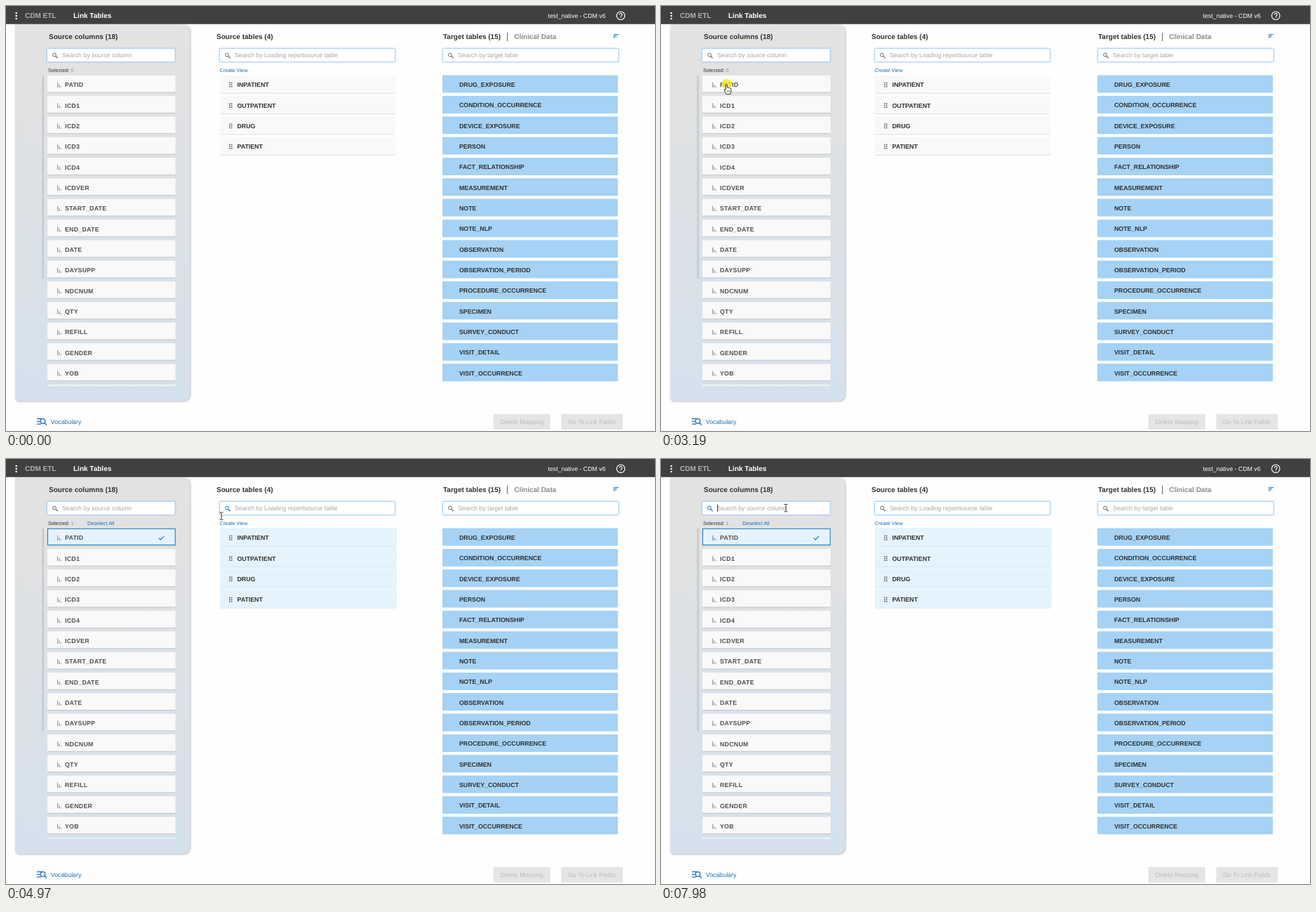
An HTML page for the animation above (8000 ms loop, 925 by 605 pixels).

```html
<!DOCTYPE html>
<html lang="en">
<head>
<meta charset="utf-8">
<title>Link Tables</title>
<style>
html, body { margin: 0; width: 100%; height: 100%; overflow: hidden; background: #fefefe; }
svg { display: block; }
text { font-family: "Liberation Sans", Arial, sans-serif; font-size: 8.8px; text-rendering: geometricPrecision; white-space: pre; }
.bold { font-weight: 700; }
.head { font-weight: 700; font-size: 10px; }
.small { font-size: 7.35px; }
</style>
</head>
<body>
<svg id="stage" width="925" height="605" viewBox="0 0 925 605">
  <defs>
    <linearGradient id="panelFill" x1="0" y1="0" x2="0" y2="1">
      <stop offset="0" stop-color="#e4e3e2"/>
      <stop offset=".25" stop-color="#e0e1e2"/>
      <stop offset="1" stop-color="#d4e1ed"/>
    </linearGradient>
    <filter id="panelShadow" x="-5%" y="-5%" width="112%" height="110%">
      <feDropShadow dx="1" dy="1" stdDeviation="1.6" flood-color="#889" flood-opacity=".6"/>
    </filter>
    <filter id="glow" x="-5%" y="-40%" width="110%" height="180%">
      <feDropShadow dx="0" dy="0" stdDeviation="1.3" flood-color="#7db8ee" flood-opacity=".75"/>
    </filter>
  </defs>
  <g id="scene"></g>
  <g id="overlay"></g>
</svg>
<script>
const LOOP = 8000, ROW = 29.33, BLUE = '#1a6fb5';
const scene = document.getElementById('scene');
const overlay = document.getElementById('overlay');

const rect = (x, y, w, h, fill, extra = '') =>
  `<rect x="${x}" y="${y}" width="${w}" height="${h}" fill="${fill}" ${extra}/>`;
const text = (x, y, str, fill, cls = '', extra = '') =>
  `<text x="${x}" y="${y}" fill="${fill}" class="${cls}" ${extra}>${str}</text>`;
const path = (d, stroke, width = 1, extra = '') =>
  `<path d="${d}" fill="none" stroke="${stroke}" stroke-width="${width}" ${extra}/>`;
const lens = (x, color, id) =>
  `<g ${id ? `id="${id}"` : ''} stroke="${color}" fill="none">
    <circle cx="${x}" cy="69.6" r="2.4"/><path d="M${x + 1.8} 71.4l2.8 2.8" stroke-width="1.3"/></g>`;
const input = (x, w, hint, id) =>
  rect(x, 60.5, w, 19, '#fff', 'rx="1" stroke="#a3cdf1" stroke-width=".8" filter="url(#glow)"') +
  lens(x + 10.5, '#666', id) + text(x + 21.5, 73, hint, '#a5a5a5');

const sourceColumns = ['PATID', 'ICD1', 'ICD2', 'ICD3', 'ICD4', 'ICDVER', 'START_DATE', 'END_DATE',
  'DATE', 'DAYSUPP', 'NDCNUM', 'QTY', 'REFILL', 'GENDER', 'YOB'];
const sourceTables = ['INPATIENT', 'OUTPATIENT', 'DRUG', 'PATIENT'];
const targetTables = ['DRUG_EXPOSURE', 'CONDITION_OCCURRENCE', 'DEVICE_EXPOSURE', 'PERSON',
  'FACT_RELATIONSHIP', 'MEASUREMENT', 'NOTE', 'NOTE_NLP', 'OBSERVATION', 'OBSERVATION_PERIOD',
  'PROCEDURE_OCCURRENCE', 'SPECIMEN', 'SURVEY_CONDUCT', 'VISIT_DETAIL', 'VISIT_OCCURRENCE'];

function header() {
  return rect(0, 0, 925, 25.5, '#404040') +
    [10, 14, 18].map(y => `<circle cx="14.7" cy="${y}" r="1.3" fill="#fff"/>`).join('') +
    text(27, 17.4, 'CDM ETL', '#b0b0b0', 'head') +
    text(96, 17.4, 'Link Tables', '#fff', 'head') +
    text(772.5, 16.6, 'test_native - CDM v6', '#fff') +
    '<circle cx="876.2" cy="13.8" r="5.8" fill="none" stroke="#fff" stroke-width="1.2"/>' +
    path('M874.3 12.4a1.9 1.9 0 1 1 2.9 1.6q-1 .6-1 1.5M876.2 16.4v1.2', '#fff', 1.1);
}

function sourcePanel() {
  const rows = sourceColumns.map((name, i) => {
    const y = 98.8 + i * ROW;
    return rect(59, y, 182.5, 24, '#f9f9f9') +
      rect(59, y + 23.7, 182.5, 1, '#c3c7ca') +
      (i ? '' : '<g id="picked"></g>') +
      path(`M73.6 ${y + 10}v7.2M76 ${y + 13}v4.2M78.3 ${y + 15.6}v1.6`, '#999', 1.2) +
      text(84, y + 16.6, name, '#505050', 'bold', 'letter-spacing=".25"');
  }).join('');
  return `<path d="M13 26H251Q262 26 262 37V551Q262 562 251 562H18Q13 562 13 557Z"
      fill="url(#panelFill)" filter="url(#panelShadow)"/>` +
    rect(0, 20, 925, 5.5, '#404040') +
    text(61, 47.4, 'Source columns (18)', '#303030', 'head') +
    input(58.5, 182.5, 'Search by source column', 'sourceLens') +
    text(60, 93.6, 'Selected:', '#333', 'small') +
    text(92.6, 93.6, '0', '#a08f86', 'small', 'id="count"') +
    text(116, 93.6, 'Deselect All', BLUE, 'small', 'id="deselect"') +
    rect(51.3, 98.5, 2.8, 289.5, '#c9cccf') + rows +
    rect(59, 539, 182.5, 1.6, '#f4f6f7');
}

function tablePanel() {
  const rows = sourceTables.map((name, i) => {
    const y = 98.8 + i * ROW;
    const dots = [0, 1, 2].map(k => path(`M318 ${y + 10.8 + k * 2.6}h1.6m1.2 0h1.6`, '#555', 1.5)).join('');
    return rect(305, y, 250, 25, '#f9f9f9', 'class="tableRow"') +
      rect(305, y + 25, 250, .9, '#dedede', 'class="tableLine"') +
      dots + text(329.5, y + 16.6, name, '#303030', 'bold');
  }).join('');
  return text(300, 47.4, 'Source tables (4)', '#303030', 'head') +
    input(304.5, 250, 'Search by Loading reportsource table', 'tableLens') +
    text(304.6, 93.6, 'Create View', BLUE, 'small') +
    rect(305, 98, 252, 113.2, '#eaf5ff', 'id="tableGlow"') + rows;
}

function targetPanel() {
  const rows = targetTables.map((name, i) => {
    const y = 98.6 + i * ROW;
    return rect(622, y, 250, 25, '#a5d2f5', 'rx="1"') +
      text(646, y + 16.3, name, '#303030', 'bold');
  }).join('');
  return text(623, 47.4, 'Target tables (15)', '#303030', 'head') +
    rect(714, 38, 1.2, 12, '#777') +
    text(724.3, 47.4, 'Clinical Data', '#8a8a8a', 'head') +
    path('M865.8 40.5h7.4M865.8 42.7h5M865.8 44.9h2.5', '#2079c8', 1.2) +
    input(622.5, 250.5, 'Search by target table') + rows;
}

function footer() {
  return path('M44 587.6h7M44 591.4h4.5M44 595.2h6', BLUE, 1.3) +
    `<circle cx="52.5" cy="591" r="3.3" fill="none" stroke="${BLUE}" stroke-width="1.3"/>` +
    path('M55 593.5l3 3', BLUE, 1.4) + text(63.8, 595, 'Vocabulary', BLUE) +
    rect(694.7, 580.7, 81, 22.3, '#e5e5e5', 'rx="1"') + text(704.4, 595, 'Delete Mapping', '#bcbcbc') +
    rect(791.4, 580.7, 87.6, 22.3, '#e5e5e5', 'rx="1"') + text(801, 595, 'Go To Link Fields', '#bcbcbc');
}

scene.innerHTML = header() + sourcePanel() + tablePanel() + targetPanel() + footer();
const el = id => document.getElementById(id);
const tableRows = [...document.querySelectorAll('.tableRow')];
const tableLines = [...document.querySelectorAll('.tableLine')];
el('picked').innerHTML = rect(59.5, 99.3, 181.7, 23, '#e6f3ff', `stroke="${BLUE}"`) +
  path('M217.7 112.4l2.5 2.5l5-5', BLUE, 1.1);

// Pointer moves: start, end, redraws, waypoints
const moves = [
  [550, 650, 3, [[800, 640], [779, 592], [742, 556], [708, 529]]],
  [900, 1260, 7, [[708, 529], [692, 547], [600, 480], [500, 395], [445, 358], [438, 354]]],
  [1510, 2270, 12, [[438, 354], [420, 335], [330, 240], [215, 130], [140, 92], [100, 98], [87.5, 109.5]]],
  [2390, 2570, 4, [[87.5, 109.5], [94.5, 111]]],
  [2820, 2820, 1, [[94.5, 111], [94, 111]]],
  [3740, 4480, 13, [[94, 111], [130, 150], [200, 215], [300, 262], [400, 266], [490, 235], [533, 170]]],
  [4550, 5340, 14, [[533, 170], [540, 110], [500, 55], [400, 32], [307, 81], [290, 140], [295, 200], [330, 230]]],
  [5400, 6190, 14, [[330, 230], [400, 235], [500, 205], [505, 145], [465.5, 101], [380, 78], [300, 74], [265, 78]]],
  [6250, 6740, 8, [[265, 78], [245, 66], [215, 53], [190, 58], [178, 69.5]]]
];

function along(points, u) {
  const last = points.length - 1;
  const i = Math.min(Math.floor(u * last), last - 1), f = u * last - i;
  const at = k => points[Math.max(0, Math.min(last, k))];
  const [a, b, c, d] = [i - 1, i, i + 1, i + 2].map(at);
  return [0, 1].map(n => b[n] + f / 2 * (c[n] - a[n] +
    f * (2 * a[n] - 5 * b[n] + 4 * c[n] - d[n] + f * (3 * (b[n] - c[n]) + d[n] - a[n]))));
}

function pointerAt(t) {
  const move = moves.filter(m => t >= m[0]).pop();
  if (!move) return null;
  const [start, end, steps, points] = move;
  const gap = (end - start) / (steps - 1) || 1;
  const step = Math.min(steps, Math.floor((t - start) / gap + .2) + 1);
  return along(points, step / steps);
}

const inside = (x, y, l, t, r, b) => x >= l && x <= r && y >= t && y <= b;
const overInput = (x, y, l, r) => inside(x, y, l, 60, r, 81.5);

const shapes = {
  arrow: '<path d="M0 0V10.5L2.5 8.2L4.2 12L5.8 11.3L4.2 7.6H7.6Z" fill="#fff" stroke="#222" stroke-width=".8"/>',
  hand: `<path d="M-1.8 8.5V1Q-.8-.7.3 1V5.2Q1.6 4.2 2.4 5.6Q3.6 4.8 4.3 6.2Q5.8 5.6 5.9 7.4V11
    Q5.5 12.5 4.8 14.5H-1Q-1.8 12.2-3.8 9.4Q-4.3 7.6-3 7.6Z" fill="#fff" stroke="#222" stroke-width=".9"/>` +
    path('M.5 9v3M2.3 9v3M4 9v3', '#444', .6),
  beam: path('M-2.5-5H-.6L0-4.4L.6-5H2.5M0-4.4V4.8M-2.5 5.4H-.6L0 4.8L.6 5.4H2.5', '#333', 1)
};

function pointer(x, y) {
  const beam = overInput(x, y, 58, 241) || overInput(x, y, 304, 555) || overInput(x, y, 622, 873);
  const hand = inside(x, y, 59, 99, 241, 535) || inside(x, y, 622, 98, 872, 534);
  return `<g transform="translate(${x.toFixed(1)} ${y.toFixed(1)})">${shapes[beam ? 'beam' : hand ? 'hand' : 'arrow']}</g>`;
}

const ramp = (t, a, b) => Math.max(0, Math.min(1, (t - a) / (b - a)));
const tip = (y, w, label, alpha) => alpha <= 0 ? '' : `<g opacity="${alpha.toFixed(2)}">` +
  rect(553.3, y, w, 17.3, '#707070', 'rx="2"') +
  text(553.3 + w / 2, y + 11.2, label, '#fff', 'small', 'text-anchor="middle"') + '</g>';

function draw(t) {
  const selected = t >= 3370, raised = t >= 3490;
  const pos = pointerAt(t);
  const show = (id, on) => el(id).setAttribute('visibility', on ? 'visible' : 'hidden');
  show('picked', selected);
  show('deselect', selected);
  show('tableGlow', raised);
  el('count').textContent = selected ? 1 : 0;
  tableRows.forEach(r => {
    r.setAttribute('fill', selected ? '#e5f3ff' : '#f9f9f9');
    r.setAttribute('width', raised ? 251.7 : selected ? 250.5 : 250);
  });
  tableLines.forEach(l => l.setAttribute('fill', selected ? '#d3e6f6' : '#dedede'));

  const tint = (id, on) => el(id).setAttribute('stroke', on ? '#1470bd' : '#666');
  tint('sourceLens', pos && overInput(...pos, 58, 241));
  tint('tableLens', pos && overInput(...pos, 304, 555));

  let out = tip(132.8, 46.5, 'outpatient', .7 * ramp(t, 5580, 5700) * (1 - ramp(t, 5730, 5860))) +
    tip(103.6, 37.5, 'inpatient', .9 * ramp(t, 5770, 5890) * (1 - ramp(t, 5970, 6130)));
  const clicking = t >= 3190 && t < 3370 || t >= 6800 && t < 6930;
  const caret = t >= 6930 && t < 7420 || t >= 7980;
  if (caret) out += rect(80, 65, 1, 10, '#333');
  if (pos) {
    if (clicking) out += `<circle cx="${pos[0] - .5}" cy="${pos[1]}" r="7" fill="#f8e71c" opacity=".8"/>`;
    out += pointer(...pos);
  }
  overlay.innerHTML = out;
}

const began = performance.now();
function tick() {
  draw((performance.now() - began) % LOOP);
  requestAnimationFrame(tick);
}
tick();
</script>
</body>
</html>
```
